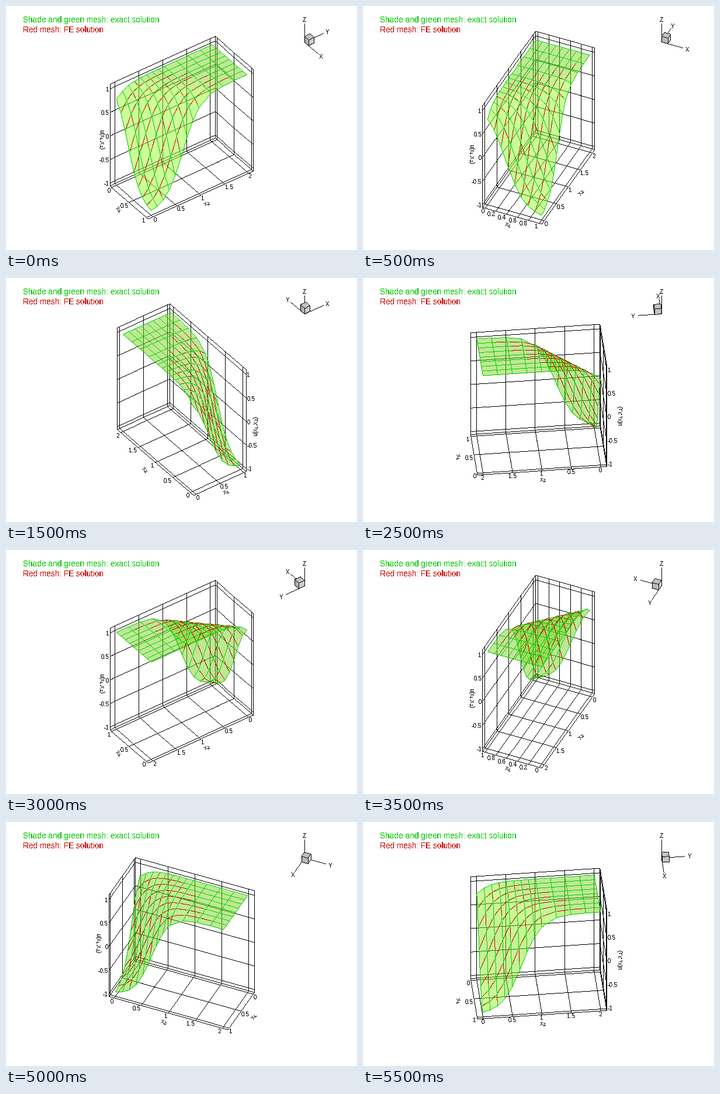
These frames come from a looping animation (601 px wide and 417 px high, 6 s). A matplotlib script:

```python
import numpy as np
import matplotlib.pyplot as plt
from matplotlib.animation import FuncAnimation
from matplotlib.collections import PolyCollection

W, H, DPI = 601, 417, 64
PX = 72 / DPI                       # points per pixel
FRAMES, LOOP_MS = 12, 6000
CENTER = np.array([300.3, 209.85])
SCALE, TILT, Z_SCALE = 101.2, 0.626, 80.5
GREEN, RED = "#00cc00", "#cc0000"
X_BOX, Y_BOX, Z_BOX = (-0.05, 1.05), (-0.1, 2.1), (-1.062, 1.098)
Y_TICKS = np.linspace(0, 2, 5)
Z_TICKS = np.linspace(-1, 1, 5)
# Offsets of the vertical title, one per view of the half turn
U_OFFSET = [(-14, 6), (-18, -5), (20, 0), (17, 9), (-18, -5), (24, 0)]

plt.rcParams.update({
    "font.family": "Liberation Sans",
    "text.antialiased": False,
})


def layer(x, y):
    return 1 - 3 * x + 3 * y


def exact(x, y):
    return np.tanh(layer(x, y))


# The mesh is twice as coarse in y beyond the layer
xs = np.linspace(0, 1, 9)
ys = np.concatenate([np.linspace(0, 1, 9), np.linspace(1.25, 2, 4)])

fig = plt.figure(figsize=(W / DPI, H / DPI), dpi=DPI, facecolor="white")
ax = fig.add_axes([0, 0, 1, 1])


class View:
    def __init__(self, degrees):
        a = np.radians(degrees)
        self.c, self.s = np.cos(a), np.sin(a)
        # Box sides nearest to the viewer, and those farthest away
        self.x_front, self.x_back = X_BOX[::-1] if self.s > 0 else X_BOX
        self.y_front, self.y_back = Y_BOX if self.c > 0 else Y_BOX[::-1]
        self.toward = np.array([self.s * 0.78, -self.c * 0.78, TILT])

    def turn(self, x, y):
        return np.array([x * self.c + y * self.s,
                         TILT * (x * self.s - y * self.c)])

    def __call__(self, x, y, z):
        p = CENTER + SCALE * self.turn(x - 0.5, y - 1)
        return p - [0, Z_SCALE * z]

    def on_surface(self, x, y):
        return self(x, y, exact(x, y))


def lines(segments, color, z):
    """Draw hard one-pixel lines, a single dot per step."""
    dots = []
    for p, q in segments:
        steps = int(np.ceil(np.abs(q - p).max())) + 1
        dots.append(np.rint(np.linspace(p, q, steps)))
    x, y = np.concatenate(dots).T
    ax.plot(x, y, ",", color=color, zorder=z)


def fills(polygons, colors, z):
    ax.add_collection(PolyCollection(polygons, facecolors=colors,
                                     edgecolors="none", zorder=z))


def label(pos, text, size=10, color="black", ha="center"):
    ax.text(pos[0], pos[1] + 0.36 * size, text, fontsize=size * PX,
            color=color, ha=ha, va="baseline", zorder=8)


def title(pos, text, angle):
    ax.text(*pos, text, fontsize=10 * PX, rotation=angle, ha="center",
            va="center", rotation_mode="anchor", zorder=8)


def draw_box(v, x_ticks):
    segments = []
    z0, z1 = Z_BOX
    for x in [*X_BOX, *x_ticks]:
        segments += [(v(x, Y_BOX[0], z0), v(x, Y_BOX[1], z0)),
                     (v(x, v.y_back, z0), v(x, v.y_back, z1))]
    for y in [*Y_BOX, *Y_TICKS]:
        segments += [(v(X_BOX[0], y, z0), v(X_BOX[1], y, z0)),
                     (v(v.x_back, y, z0), v(v.x_back, y, z1))]
    for z in [*Z_BOX, *Z_TICKS]:
        segments += [(v(X_BOX[0], v.y_back, z), v(X_BOX[1], v.y_back, z)),
                     (v(v.x_back, Y_BOX[0], z), v(v.x_back, Y_BOX[1], z))]
    lines(segments, "black", 1)


def label_floor_axis(place, ticks, middle, name):
    """Number one floor edge and write its name on the outer side."""
    start, end = place(ticks[0]), place(ticks[-1])
    dx, dy = end - start
    normal = np.array([-dy, dx]) / np.hypot(dx, dy)
    if normal[1] < 0:
        normal = -normal
    side = 0 if abs(normal[0]) < 0.15 else np.sign(normal[0])
    ha = {-1: "right", 0: "center", 1: "left"}[int(side)]
    for t in ticks:
        label(place(t) + [side, 4.6], f"{t:.1f}".replace(".0", ""), ha=ha)
    angle = np.degrees(np.arctan(-dy / dx))
    title(place(middle) + normal * [28, 16], name, angle)


def draw_labels(v, x_ticks, index):
    z0 = Z_BOX[0]
    label_floor_axis(lambda x: v(x, v.y_front, z0), x_ticks, 0.5,
                     r"$\mathregular{x_1}$")
    label_floor_axis(lambda y: v(v.x_front, y, z0), Y_TICKS, 1,
                     r"$\mathregular{x_2}$")
    # The vertical scale stands on the nearer of the two outline edges
    corners = [(v.x_front, v.y_back), (v.x_back, v.y_front)]
    edge = max(corners, key=lambda c: v(*c, 0)[1])
    right = v(*edge, 0)[0] > CENTER[0]
    for z in Z_TICKS:
        label(v(*edge, z) + [2 if right else -1, 0.5], f"{z:g}",
              ha="left" if right else "right")
    title(v(*edge, sum(Z_BOX) / 2) + U_OFFSET[index % 6],
          r"u($\mathregular{x_1}$,$\mathregular{x_2}$)", 90 if right else 270)


def draw_surface(v):
    cells = []
    for x0, x1 in zip(xs, xs[1:]):
        for y0, y1 in zip(ys, ys[1:]):
            ring = [(x0, y0), (x1, y0), (x1, y1), (x0, y1)]
            mx, my = (x0 + x1) / 2, (y0 + y1) / 2
            u = exact(mx, my)
            slope = 3 * (1 - u * u)
            normal = np.array([slope, -slope, 1])
            facing = abs(normal @ v.toward) / np.linalg.norm(normal)
            light = 0.82 + 0.18 * np.clip((facing - 0.6) / 0.3, 0, 1)
            color = (0.6 * light, light, 0.2 * light, 0.5)
            depth = v.toward @ [mx, my, u]
            cells.append((depth, [v.on_surface(*p) for p in ring], color))
    cells.sort(key=lambda cell: cell[0])
    fills([c[1] for c in cells], [c[2] for c in cells], 3)


def draw_meshes(v):
    """Green mesh, with the red one showing through in the layer."""
    green, red = [], []

    def edge(p, q, start, stop, shows_red):
        a, b = v.on_surface(*p), v.on_surface(*q)
        green.append((a, b))
        if shows_red:
            red.append((a + start * (b - a), a + stop * (b - a)))

    for i, x in enumerate(xs):
        for j, y in enumerate(ys):
            steep = -2 < layer(x, y) < 3.1
            if j + 1 < len(ys):
                inside = 0 < i < len(xs) - 1
                edge((x, y), (x, ys[j + 1]), 0.15, 0.8, steep and inside)
            if i + 1 < len(xs):
                edge((x, y), (xs[i + 1], y), 0.1, 0.6,
                     steep and j > 0 and (i + j) % 3 == 0)
    lines(green, GREEN, 4)
    lines(red, RED, 5)


def draw_compass(v):
    origin = np.array([510.6, 62])
    up = np.array([0, -0.795])
    axes = {"X": v.turn(1, 0), "Y": v.turn(0, 1), "Z": up}
    lines([(origin, origin + 39.5 * d) for d in axes.values()], "black", 5)
    for name, d in axes.items():
        label(origin + 49 * d, name)

    def corner(x, y, z):
        return origin + 12 * (v.turn(x, y) + z * up)

    fx, fy = int(v.s > 0), int(v.c < 0)
    faces = [
        [corner(0, 0, 1), corner(1, 0, 1), corner(1, 1, 1), corner(0, 1, 1)],
        [corner(fx, 0, 0), corner(fx, 1, 0), corner(fx, 1, 1),
         corner(fx, 0, 1)],
        [corner(0, fy, 0), corner(1, fy, 0), corner(1, fy, 1),
         corner(0, fy, 1)],
    ]
    greys = ["0.76",
             str(0.76 + 0.08 * v.c * (2 * fx - 1)),
             str(0.76 + 0.08 * v.s * (2 * fy - 1))]
    fills(faces, greys, 6)
    lines([pair for f in faces for pair in zip(f, f[1:] + f[:1])], "black", 7)


def draw(index):
    ax.clear()
    ax.set_xlim(0, W)
    ax.set_ylim(H, 0)
    ax.axis("off")
    v = View(54 - 360 / FRAMES * index)
    x_length = SCALE * 1.1 * np.linalg.norm(v.turn(1, 0))
    x_ticks = np.linspace(0, 1, 6 if x_length > 102 else 3)
    draw_box(v, x_ticks)
    draw_surface(v)
    draw_meshes(v)
    draw_labels(v, x_ticks, index)
    draw_compass(v)
    label((29, 23), "Shade and green mesh: exact solution", 13.6, GREEN,
          "left")
    label((29, 40), "Red mesh: FE solution", 13.6, RED, "left")
    return []


animation = FuncAnimation(fig, draw, frames=FRAMES, init_func=lambda: [],
                          interval=LOOP_MS / FRAMES, repeat=True,
                          repeat_delay=0, blit=False)
plt.show()
```
